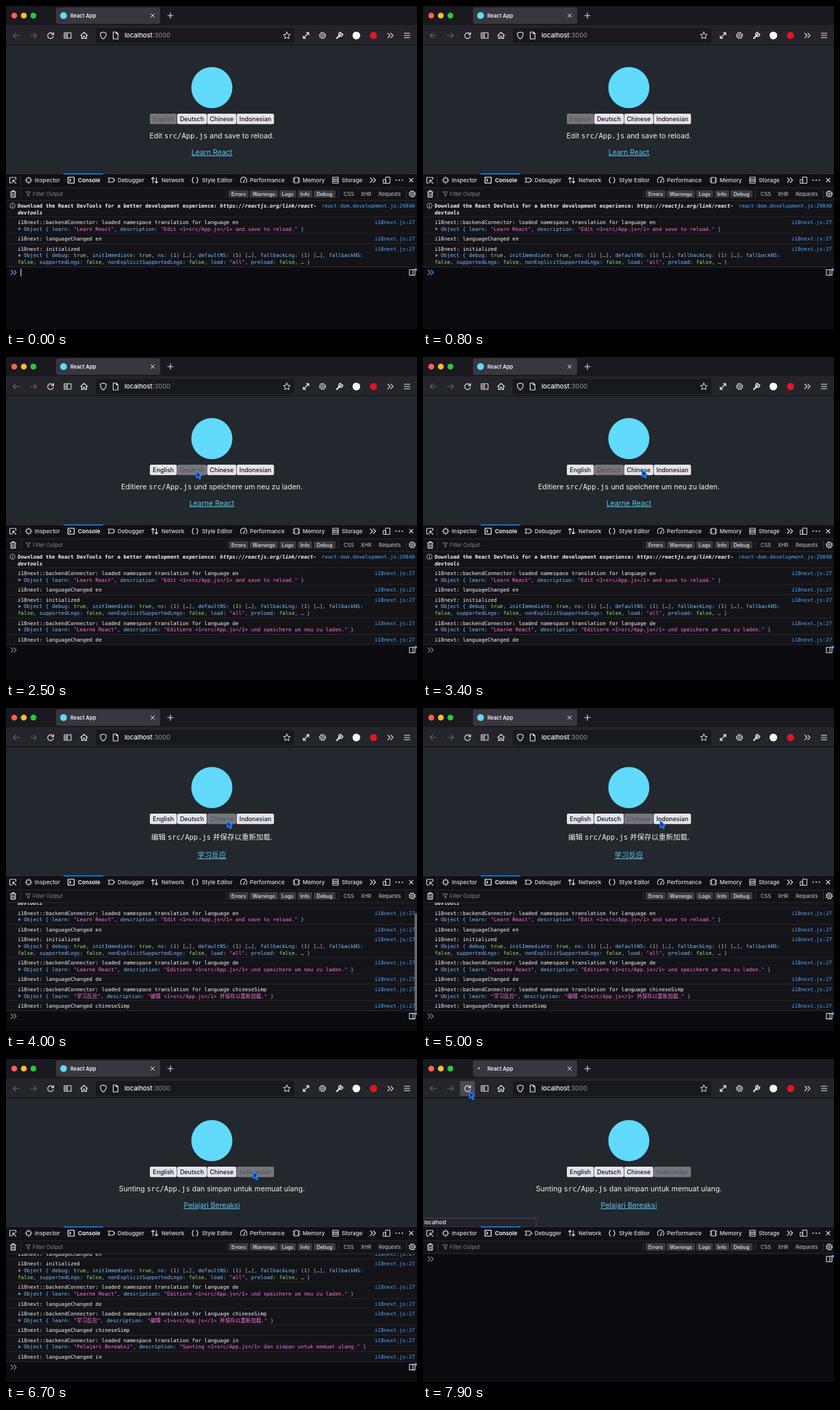
An HTML page for the animation above (8000 ms loop, 600 by 471 pixels).

```html
<!DOCTYPE html>
<html lang="en">
<head>
<meta charset="utf-8">
<title>Language switcher</title>
<style>
  html, body { margin: 0; width: 100%; height: 100%; overflow: hidden; background: #0c0b10; }
  svg { display: block; width: 100vw; height: 100vh; font-family: Inter, "Noto Sans CJK SC", "Noto Sans CJK", sans-serif; }
  .mono { font-family: "DejaVu Sans Mono", "Noto Sans CJK SC", "Noto Sans CJK", monospace; }
</style>
</head>
<body>
<svg id="stage" viewBox="0 0 600 471" xmlns="http://www.w3.org/2000/svg"></svg>
<script>
const LOOP = 8000;
const LINE = 9.7;
const LOG_TOP = 284, LOG_BOTTOM = 441.7;
const LIGHT = '#e4e3e8', DIM = '#8b8a92', BLUE = '#4fa8ff';

const esc = s => s.replace(/</g, '&lt;').replace(/>/g, '&gt;');
const rect = (x, y, w, h, fill, more = '') =>
  `<rect x="${x}" y="${y}" width="${w}" height="${h}" fill="${fill}" ${more}/>`;
const circle = (x, y, r, fill, more = '') =>
  `<circle cx="${x}" cy="${y}" r="${r}" fill="${fill}" ${more}/>`;
const text = (x, y, body, size, fill = LIGHT, more = '') =>
  `<text x="${x}" y="${y}" font-size="${size}" fill="${fill}" ${more}>${body}</text>`;
const icon = (x, y, d, color = LIGHT, width = 1.1) =>
  `<path transform="translate(${x} ${y})" d="${d}" fill="none" stroke="${color}" stroke-width="${width}" stroke-linecap="round" stroke-linejoin="round"/>`;
const gear = (x, y) =>
  circle(x, y, 4.5, 'none', `stroke="${LIGHT}" stroke-width="1.2" stroke-dasharray="1.8 1.734"`) +
  circle(x, y, 3.6, 'none', `stroke="${LIGHT}" stroke-width="1"`) + circle(x, y, 1.4, 'none', `stroke="${LIGHT}" stroke-width=".9"`);

const CROSS = 'M-2.6-2.6L2.6 2.6M2.6-2.6L-2.6 2.6';
const CHEVRONS = 'M-3.6-3.4L-.4 0L-3.6 3.4M.8-3.4L4 0L.8 3.4';
const BOX = 'M-4-4H4V4H-4Z';
const ARROW_LEFT = 'M4.5 0H-4.5M-.8-3.7L-4.5 0L-.8 3.7';
const ARROW_RIGHT = 'M-4.5 0H4.5M.8-3.7L4.5 0L.8 3.7';

const languages = {
  en: { button: 0, learn: 'Learn React', before: 'Edit', after: 'and save to reload.' },
  de: { button: 1, learn: 'Learne React', before: 'Editiere', after: 'und speichere um neu zu laden.' },
  chineseSimp: { button: 2, learn: '学习反应', before: '编辑', after: '并保存以重新加载.', lift: 3 },
  in: { button: 3, learn: 'Pelajari Bereaksi', before: 'Sunting', after: 'dan simpan untuk memuat ulang.' }
};
const buttons = [['English', 210, 39.4], ['Deutsch', 250, 43], ['Chinese', 293.6, 42.6], ['Indonesian', 336.8, 54.4]];

function browserChrome() {
  const lights = ['#fe5f57', '#febc2e', '#28c840'].map((c, i) => circle(12 + 14 * i, 14, 4.3, c)).join('');
  return rect(0, 0, 600, 28, '#1a1920') + lights +
    rect(73, 2, 152, 24, '#38373f', 'rx="3"') +
    circle(84, 14, 5, '#61dafb', 'id="favicon"') + circle(81.5, 13.5, 1.5, '#b5b4bb', 'id="loading"') +
    text(94, 17, 'React App', 7.5, '#f5f4fa', 'font-weight="600"') +
    icon(214, 14, CROSS, LIGHT, 1) + icon(240, 14, 'M-4 0H4M0-4V4') +
    rect(0, 28, 600, 28, '#25242c') + rect(0, 56, 600, 1, '#0d0d10') +
    rect(54, 32, 22, 22, '#4a4952', 'rx="3" id="reloadHover"') +
    icon(15, 43, ARROW_LEFT, '#65646c') + icon(40, 43, ARROW_RIGHT, '#65646c') +
    icon(65, 43, 'M3.8-1.6A4.2 4.2 0 1 0 4.2 1M4.5-4.5V-1.3H1.3') +
    icon(90, 43, 'M-5-4H5V4H-5ZM-.5-4V4M-3.4-1.8H-2M-3.4 0H-2M-3.4 1.8H-2') +
    icon(114, 43, 'M-5 0L0-4.6L5 0M-3.6-1V4.4H-1.2V1H1.2V4.4H3.6V-1') +
    rect(131, 32, 290, 22, '#19181f', 'rx="3"') +
    icon(142, 43, 'M0-5L4.3-3.6C4.3 1 3 3.5 0 5C-3 3.5-4.3 1-4.3-3.6Z') +
    icon(160, 43, 'M-3.5-5H1L3.5-2.5V5H-3.5ZM1-5V-2.5H3.5') +
    text(173, 46.4, '<tspan fill="#fbfbfe" font-weight="500">localhost</tspan>:3000', 9.4, '#95949c') +
    icon(410, 43, 'M0-5L1.5-1.7L5-1.3L2.4 1L3.1 4.6L0 2.8L-3.1 4.6L-2.4 1L-5-1.3L-1.5-1.7Z', LIGHT, 1) +
    icon(438, 43, 'M-4 4L4-4M.8-4H4V-.8M-.8 4H-4V.8', LIGHT, 1.3) +
    gear(462, 43) +
    icon(487, 43, 'M-4 4L.8-.8', LIGHT, 2.3) + icon(487, 43, 'M4.5-2.4A3 3 0 1 1 2-4.6L1.6-2.2Z', LIGHT, 1.4) +
    circle(511.5, 43, 5.6, '#fff') + circle(536.5, 43, 5.2, '#e01722') +
    icon(561, 43, CHEVRONS) + icon(585.5, 43, 'M-4-3.2H4M-4 0H4M-4 3.2H4');
}

function page() {
  const row = buttons.map(([label, x, w]) => `<g class="button">${rect(x, 157, w, 15.2, '#e6e4ea', 'rx="2"')}` +
    text(x + w / 2, 168.2, label, 8.9, '#111', 'text-anchor="middle" font-weight="500"') + '</g>').join('');
  return rect(0, 57, 600, 188, '#23272e') +
    `<g id="upper">${circle(300.5, 119, 30, '#61dafb')}${row}</g>` +
    text(300.5, 192.6, '', 10.5, '#f2f2f4', 'text-anchor="middle" id="description"') +
    text(300.5, 216.8, '', 10.5, '#58c8e8', 'text-anchor="middle" text-decoration="underline" id="learn"') +
    `<g id="status">${rect(-1, 232, 166, 13, '#25242c', 'stroke="#55545c" stroke-width=".8" rx="1.5"')}` +
    text(2, 241, 'localhost', 7.4, '#f3f3f6', 'font-weight="500"') + '</g>';
}

function devtoolsBars() {
  const tabs = [
    ['Inspector', 33, 42, 'M-3-3H3V3H-3ZM0-5V-3M0 3V5M-5 0H-3M3 0H5'],
    ['Console', 95, 105, 'M-4.5-4.2H4.5V4.2H-4.5ZM-2.3-1.8L-.4 0L-2.3 1.8'],
    ['Debugger', 154, 163, 'M-4.8-3H1.8L4.8 0L1.8 3H-4.8L-3 0Z'],
    ['Network', 217, 227, 'M-2.5 4V-4M-4.5-2L-2.5-4L-.5-2M2.5-4V4M.5 2L2.5 4L4.5 2'],
    ['Style Editor', 276, 286, 'M-1.8-4C-5-4-2.5-.5-4.5 0C-2.5 .5-5 4-1.8 4M1.8-4C5-4 2.5-.5 4.5 0C2.5 .5 5 4 1.8 4'],
    ['Performance', 347, 356, 'M-3.5 3.5A4.7 4.7 0 1 1 3.5 3.5M0 2L2-1.5M-1 3H1'],
    ['Memory', 424, 433, 'M-3-4H3V4H-3ZM-5-2.5H-3M-5 0H-3M-5 2.5H-3M3-2.5H5M3 0H5M3 2.5H5'],
    ['Storage', 481, 490, 'M-4-4.3H4V4.3H-4ZM-4-1.4H4M-4 1.4H4']
  ].map(([label, ix, tx, d]) => {
    const active = label === 'Console';
    return icon(ix, 254, d, active ? '#fff' : '#dcdce0', 1.1) +
      text(tx, 257, label, 8.2, active ? '#fff' : '#dcdce0', `font-weight="${active ? 600 : 500}"`);
  }).join('');
  const chips = [['Errors', 325, 29], ['Warnings', 356, 41], ['Logs', 399, 24.5], ['Info', 426, 21], ['Debug', 449, 32]]
    .map(([label, x, w]) => rect(x, 268.5, w, 11, '#3a3a40', 'rx="1.5"') +
      text(x + w / 2, 276.7, label, 7.3, '#e9e9ed', 'text-anchor="middle" font-weight="500"')).join('');
  const filters = [['CSS', 493], ['XHR', 518], ['Requests', 544]]
    .map(([label, x]) => text(x, 276.7, label, 7.4, '#cfcfd4')).join('');
  const dividers = [21, 321, 485, 584].map(x => rect(x, 268, .8, 12, '#3b3b41')).join('');
  return rect(0, 244.5, 600, 21, '#111014') + rect(0, 244, 600, .8, '#38383d') +
    rect(84, 244, 58, 1.6, '#0a84ff') +
    icon(10, 254, 'M-1 4H-4.5V-4H4.5V-1M0-.2L4.5 4.5M0 3V-.2H3', '#d7d7db') + rect(20.5, 248, .8, 13, '#38383d') + tabs +
    icon(535.5, 254, CHEVRONS) + icon(556, 254, 'M-1.5-4.5H4.5V4.5H-1.5ZM-5-1H-1.5V4.5H-5Z', '#d7d7db', 1) +
    [569.5, 574, 578.5].map(x => circle(x, 254, 1.1, '#d7d7db')).join('') + icon(591.5, 254, CROSS) +
    rect(0, 265, 600, 19, '#141318') + rect(0, 264.7, 600, .8, '#303036') + rect(0, 283.4, 600, .8, '#303036') +
    icon(10.5, 274, 'M-4-3H4M-1.4-3V-4.6H1.4V-3M-3.2-3V4.6H3.2V-3M-1.2-.8V2.6M1.2-.8V2.6') +
    icon(32.5, 274, 'M-3.2-3H3.2L.9 0V3.4L-.9 2.2V0Z', DIM, .9) +
    text(39, 276.8, 'Filter Output', 7.5, DIM) + dividers + chips + filters + gear(593, 274);
}

const tokenColor = s => s[0] === '"' ? '#ff6fe0' : /^(true|false)$/.test(s) ? '#8ee67c' : /^(\(1\)|\[…\]|…)$/.test(s) ? '#b9b9bf' : '#75bfff';
const highlight = line => line.split(/("[^"]*"|true|false|\(1\)|\[…\]|…)/).filter(Boolean)
  .map(s => `<tspan fill="${tokenColor(s)}">${esc(s)}</tspan>`).join('');

function logEntries() {
  const objectOf = ({ learn, before, after }) =>
    highlight(`Object { learn: "${learn}", description: "${before} <1>src/App.js</1> ${after}" }`);
  const loaded = code => [`i18next::backendConnector: loaded namespace translation for language ${code}`, objectOf(languages[code])];
  const changed = code => [`i18next: languageChanged ${code}`];
  const intro = ['Download the React DevTools for a better development experience: <tspan font-style="italic">https://reactjs.org/link/react-</tspan>',
    '<tspan font-style="italic">devtools</tspan>'];
  const init = ['i18next: initialized',
    highlight('Object { debug: true, initImmediate: true, ns: (1) […], defaultNS: (1) […], fallbackLng: (1) […], fallbackNS:'),
    highlight('false, supportedLngs: false, nonExplicitSupportedLngs: false, load: "all", preload: false, … }')];
  return [intro, loaded('en'), changed('en'), init,
    ...['de', 'chineseSimp', 'in'].flatMap(code => [loaded(code), changed(code)])];
}

const bottoms = [];
function logRows() {
  let top = LOG_TOP;
  return logEntries().map((lines, n) => {
    const height = lines.length * LINE + 4.8;
    const body = lines.map((line, i) => {
      const isObject = n > 0 && i === 1, y = top + 9.8 + i * LINE;
      return (isObject ? `<path d="M18.3 ${y - 5}L22 ${y - 2.7}L18.3 ${y - .4}Z" fill="#8f8f96"/>` : '') +
        text(isObject ? 26 : 17, y, line, 7.55, '#f6f6f9', n ? '' : 'font-weight="bold"');
    }).join('');
    const link = text(597, top + 9.8, n ? 'i18next.js:27' : 'react-dom.development.js:29840', 7.55, BLUE, 'text-anchor="end"');
    const info = n ? '' : circle(9.5, top + 7.2, 3.8, 'none', 'stroke="#c8c8cd" stroke-width=".8"') + icon(9.5, top + 7.2, 'M0-1.8V-1.7M0 0V2', '#c8c8cd', 1);
    const background = rect(0, top, 600, height, '#141318');
    top += height;
    bottoms.push(top);
    return `<g class="log">${background}${body}${link}${info}${rect(0, top - .8, 600, .8, '#2e2e35')}</g>`;
  }).join('');
}

const stage = document.getElementById('stage');
stage.innerHTML = `<clipPath id="logClip"><rect y="284" width="600" height="187"/></clipPath>` +
  rect(0, 0, 600, 471, '#0c0b10') + browserChrome() + page() +
  `<g clip-path="url(#logClip)"><g id="logs" class="mono">${logRows()}</g></g>` +
  rect(596.5, LOG_TOP, 3.5, 0, '#6c6b71', 'rx="1.5" id="scrollbar"') + devtoolsBars() +
  `<g id="prompt"><g id="chevron">${icon(11, 0, CHEVRONS, 'currentColor', 1.1)}</g>` +
  rect(21.3, -5.3, 1, 11, '#f5f5f8', 'id="caret"') +
  icon(593, 0, BOX + 'M1-4V4', '#dcdce0', 1.1) + circle(598, -4, 2, BLUE) + '</g>' +
  '<path id="cursor" d="M0 0V10.2L2.4 8.1L4.2 12L6.2 11.1L4.4 7.3H7.6Z" fill="#0b22c4" stroke="#2fa4ff" stroke-width="1.1" stroke-linejoin="round"/>';

const byId = id => document.getElementById(id);
const show = (el, on) => el.setAttribute('visibility', on ? 'visible' : 'hidden');
const move = (el, x, y) => el.setAttribute('transform', `translate(${x} ${y})`);
const buttonEls = [...document.querySelectorAll('.button')];
const logEls = [...document.querySelectorAll('.log')];

const cursorStops = [[1100, 330, 236], [1500, 286, 173], [1900, 286, 173], [2150, 278, 166], [2900, 278, 166],
  [3500, 323, 164], [4600, 323, 164], [5300, 361, 164], [6900, 361, 164], [7600, 68, 47], [LOOP, 68, 47]];
const CLICK = { de: 2200, chineseSimp: 3800, in: 5700, inLogged: 6000, reload: 7800 };
const SCROLLBAR_TIME = 650;

function cursorAt(t) {
  const next = Math.max(1, cursorStops.findIndex(s => s[0] > t));
  const [t0, x0, y0] = cursorStops[next - 1], [t1, x1, y1] = cursorStops[next];
  const p = Math.min(1, Math.max(0, (t - t0) / (t1 - t0))), e = p * p * (3 - 2 * p);
  return [x0 + (x1 - x0) * e, y0 + (y1 - y0) * e];
}

let shownCode;
function setLanguage(code) {
  if (code === shownCode) return;
  shownCode = code;
  const { button, learn, before, after, lift = 0 } = languages[code];
  byId('description').innerHTML = `${before} <tspan class="mono">src/App.js</tspan> ${after}`;
  byId('learn').textContent = learn;
  move(byId('upper'), 0, -lift);
  move(byId('description'), 0, -lift / 3);
  move(byId('learn'), 0, lift / 2);
  buttonEls.forEach((el, i) => {
    el.children[0].setAttribute('fill', i === button ? '#76767b' : '#e6e4ea');
    el.children[1].setAttribute('fill', i === button ? '#55555b' : '#111');
  });
}

function setScrollbar(t, end) {
  const view = LOG_BOTTOM - LOG_TOP, thumb = Math.min(view, view * view / Math.max(1, end - LOG_TOP));
  const bar = byId('scrollbar');
  bar.setAttribute('y', LOG_BOTTOM - thumb);
  bar.setAttribute('height', thumb);
  show(bar, [CLICK.chineseSimp, CLICK.inLogged].some(at => t >= at && t < at + SCROLLBAR_TIME));
}

function render(t) {
  setLanguage(t < CLICK.de ? 'en' : t < CLICK.chineseSimp ? 'de' : t < CLICK.in ? 'chineseSimp' : 'in');
  const reloading = t >= CLICK.reload;
  const count = reloading ? 0 : t < CLICK.de ? 4 : t < CLICK.chineseSimp ? 6 : t < CLICK.inLogged ? 8 : 10;
  const end = count ? bottoms[count - 1] : LOG_TOP;
  const scroll = Math.max(0, end - LOG_BOTTOM);
  logEls.forEach((el, i) => show(el, i < count));
  move(byId('logs'), 0, -scroll);
  move(byId('prompt'), 0, end - scroll + 7.7);
  setScrollbar(t, end);

  const focused = t < CLICK.de;
  byId('chevron').setAttribute('color', focused ? BLUE : '#8b8a92');
  show(byId('caret'), focused && t % 1000 < 500);
  show(byId('cursor'), t >= cursorStops[0][0]);
  move(byId('cursor'), ...cursorAt(t));
  show(byId('reloadHover'), t >= 7500);
  show(byId('favicon'), !reloading);
  show(byId('loading'), reloading);
  show(byId('status'), reloading);
}

const start = performance.now();
function tick() {
  render((performance.now() - start) % LOOP);
  requestAnimationFrame(tick);
}
tick();
</script>
</body>
</html>
```
